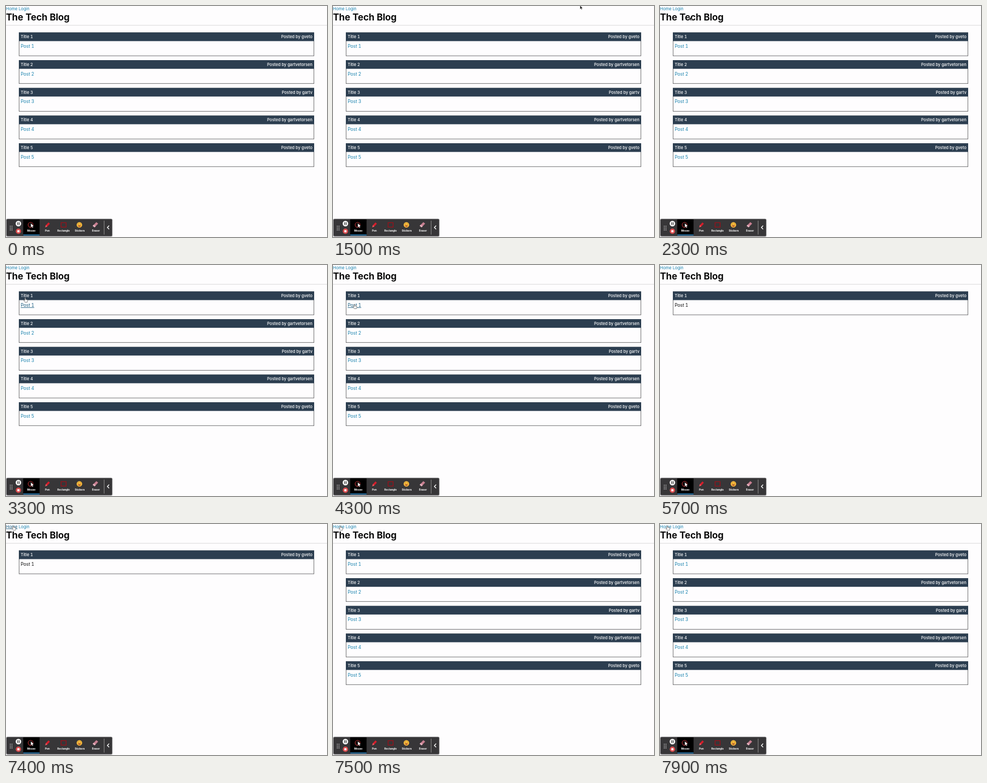
Recreate the animation shown at these times as an HTML page. Size 600 px wide and 431 px high, loop 8 s.

```html
<!DOCTYPE html>
<html lang="en">
<head>
<meta charset="utf-8">
<title>The Tech Blog</title>
<style>
  html, body { margin: 0; width: 100%; height: 100%; overflow: hidden; background: #fefdfe; }
  svg { display: block; width: 100vw; height: 100vh; font-family: Inter, "Open Sans", sans-serif; font-variant-numeric: tabular-nums; }
  .heading { font-size: 17.2px; font-weight: 700; letter-spacing: -.12px; fill: #0a0a0a; }
  .nav { font-size: 7.7px; }
  .bar { font-size: 7.6px; font-weight: 500; fill: #fefefe; }
  .post { font-size: 8.4px; }
  .link { fill: #1580ad; }
  .hover { fill: #12587c; text-decoration: underline; }
  .label { font-size: 4.7px; font-weight: 700; fill: #fff; text-anchor: middle; }
  .end { text-anchor: end; }
</style>
</head>
<body>
<svg viewBox="0 0 600 431">
  <rect width="600" height="431" fill="#fefdfe"/>
  <text class="nav link" id="home" x="0" y="7.6">Home</text>
  <text class="nav link" id="login" x="23.7" y="7.6">Login</text>
  <text class="heading" x="0" y="27">The Tech Blog</text>
  <path d="M0 36H600" stroke="#d3d2d3" stroke-width=".9"/>
  <g id="posts"></g>

  <g id="toolbar">
    <rect x="0" y="396.8" width="199.2" height="34" rx="2.5" fill="#bdbcbe"/>
    <rect x="1" y="397.6" width="197.4" height="32" rx="2" fill="#373638"/>
    <path d="M32 398V429" stroke="#29282a" stroke-width=".6"/>
    <rect x="32.3" y="398" width="30.4" height="30" fill="#000"/>
    <path d="M32.3 427.3H62.7" stroke="#2f8fd0" stroke-width="1.6"/>
    <path d="M8 410V419M11.2 410V419" stroke="#d8d8d8" stroke-width="1.3" stroke-dasharray="1.3 1.25"/>
    <circle cx="23.2" cy="406" r="5.2" fill="#f4f4f4"/>
    <path d="M21.8 403.6V408.4M24.6 403.6V408.4" stroke="#333" stroke-width="1.3"/>
    <circle cx="23.2" cy="420.2" r="5" fill="#d94a4c"/>
    <rect x="21.2" y="418.2" width="4" height="4" rx=".4" fill="#fff"/>
    <circle cx="46" cy="408.3" r="4.6" fill="none" stroke="#c4373a" stroke-width="1.1"/>
    <path d="M46.3 405.3V413.2L48.2 411.5L49.6 414.3L50.9 413.6L49.6 411L52 410.8Z" fill="#fff" stroke="#111" stroke-width=".4"/>
    <path d="M73.3 412.8L74.6 408.7L79.4 403.8L82 406.2L77.2 411.4Z" fill="#d51e2b"/>
    <path d="M73.3 412.8L74.6 408.7L77.2 411.4Z" fill="#ee626a"/>
    <rect x="103" y="404.3" width="9.4" height="8.2" fill="none" stroke="#9c1019" stroke-width="1.3"/>
    <circle cx="137.2" cy="408.4" r="5.2" fill="#f4b93c"/>
    <path d="M134.2 407Q135 405.9 135.8 407M138.6 407Q139.4 405.9 140.2 407" fill="none" stroke="#80521c" stroke-width=".7"/>
    <path d="M134.4 409.4H140Q139.6 411.8 137.2 411.8T134.4 409.4Z" fill="#a8452c"/>
    <path d="M162 410.2L168.8 403.2L172.3 406L165.6 413Z" fill="#c98092"/>
    <path d="M162 410.2L164 408.1L167.6 410.9L165.6 413Z" fill="#e6b4c0"/>
    <path d="M183.4 400.5V426.5" stroke="#a9a9a9" stroke-width=".8"/>
    <path d="M192.7 409.8L189.5 413.2L192.7 416.6" fill="none" stroke="#fff" stroke-width="1.4"/>
  </g>

  <path id="arrow" d="M0 0V7L1.6 5.6L2.7 8L3.8 7.5L2.8 5.2H5Z" fill="#111" stroke="#fff" stroke-width=".5"/>
  <path id="hand" d="M-.8 .7Q0 -.5 .8 .7V3.2L4 4Q4.8 4.4 4.5 5.8L3.7 8.5H-.5L-2.9 5.4Q-3 4.2 -1.8 4.6L-.8 5.4Z" fill="#fff" stroke="#444" stroke-width=".65"/>
</svg>
<script>
const LOOP = 8000, STEP = 100;
const OPEN = 4400, BACK = 7500; // page changes
const PITCH = 51.7;
const authors = ["gveto", "gartvetorsen", "gartv", "gartvetorsen", "gveto"];
const get = id => document.getElementById(id);
const show = (el, on) => el.setAttribute("visibility", on ? "visible" : "hidden");

get("posts").innerHTML = authors.map((name, i) => `
  <g transform="translate(0 ${i * PITCH})">
    <rect x="24.4" y="49.8" width="551.2" height="43.2" fill="none" stroke="#4a4a4c" stroke-width=".8"/>
    <rect x="24" y="49.4" width="552" height="16.1" fill="#2c3e50"/>
    <text class="bar" x="27.5" y="60.4">Title ${i + 1}</text>
    <text class="bar end" x="572.8" y="60.4">Posted by ${name}</text>
    <text class="post link" x="27.5" y="78">Post ${i + 1}</text>
  </g>`).join("");

const cards = [...get("posts").children];
const firstPost = cards[0].querySelector(".post");

[["Mouse", 47.3], ["Pen", 77.3], ["Rectangle", 107.6], ["Stickers", 137.8], ["Eraser", 168]].forEach(([word, x]) =>
  get("toolbar").insertAdjacentHTML("beforeend", `<text class="label" x="${x}" y="421.4">${word}</text>`));

// Cursor stops: time, x, y
const visits = [
  [[1500, 461.8, -1], [2300, 55, 20], [2700, 33, 3], [3200, 33, 3], [3300, 36, 61], [4000, 40.2, 73], [5700, 40.2, 73]],
  [[6200, 38, 68], [6800, 13.8, 3.2], [8000, 13.8, 3.2]]
];

function cursorAt(t) {
  const path = visits.find(v => t >= v[0][0] && t < v[v.length - 1][0]);
  if (!path) return null;
  const i = path.findIndex(stop => t < stop[0]);
  const [t0, x0, y0] = path[i - 1], [t1, x1, y1] = path[i];
  const u = (t - t0) / (t1 - t0), k = u * u * (3 - 2 * u);
  return [x0 + (x1 - x0) * k, y0 + (y1 - y0) * k];
}

function setLink(el, hovered) {
  el.classList.toggle("link", !hovered);
  el.classList.toggle("hover", hovered);
}

function draw(now) {
  const t = Math.floor(now % LOOP / STEP) * STEP;
  const single = t >= OPEN && t < BACK;
  const onLogin = t >= 2600 && t < 3200;
  const onPost = t >= 3300 && t < OPEN;
  const onHome = t >= 6700 && t < BACK;

  cards.forEach((card, i) => show(card, !i || !single));
  setLink(get("login"), onLogin);
  setLink(get("home"), onHome);
  setLink(firstPost, onPost);
  firstPost.style.fill = single ? "#0a0a0a" : "";

  const spot = cursorAt(t);
  const pointing = onLogin || t >= 3300 && t < 5700 || t >= 6700;
  for (const id of ["arrow", "hand"]) {
    show(get(id), spot && (id === "hand") === pointing);
    if (spot) get(id).setAttribute("transform", `translate(${spot})`);
  }
  requestAnimationFrame(() => draw(performance.now() - start));
}

const start = performance.now();
draw(0);
</script>
</body>
</html>
```
